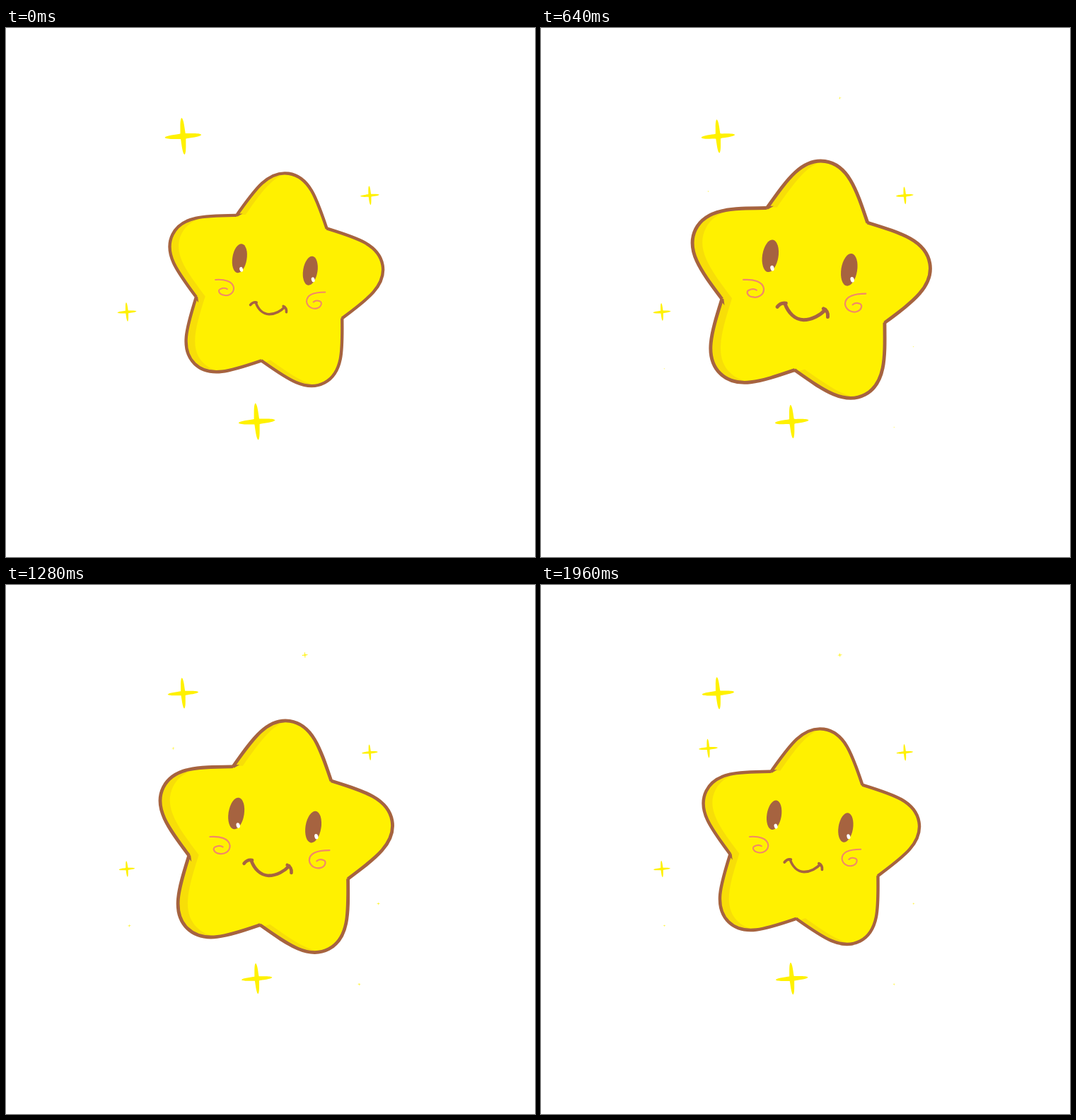
An HTML page that plays this animation: 748 px wide and 748 px high, repeating every 2 s.

```html
<!DOCTYPE html>
<html lang="en">
<head>
<meta charset="utf-8">
<title>Twinkling star</title>
<style>
  html, body { margin: 0; width: 100%; height: 100%; overflow: hidden; background: #fff; }
  svg { display: block; width: 100vw; height: 100vh; }
</style>
</head>
<body>
<svg viewBox="0 0 748 748">
  <defs>
    <path id="body"/>
    <clipPath id="inside"><use href="#body"/></clipPath>
    <path id="spark" transform="rotate(-4.5)"
      d="M0-26C3-24 3-9 3.7-3.7C9-3 24-3 26 0C24 3 9 3 3.7 3.7C3 9 3 24 0 26C-3 24-3 9-3.7 3.7C-9 3-24 3-26 0C-24-3-9-3-3.7-3.7C-3-9-3-24 0-26Z"/>
    <g id="eye">
      <ellipse rx="11.6" ry="23.6" transform="rotate(9)" fill="#a66340"/>
    </g>
  </defs>
  <g id="sparks" fill="#fff100"></g>
  <g id="star">
    <use href="#body" fill="#f7de08"/>
    <g clip-path="url(#inside)"><use href="#body" x="14.5" y="-1" fill="#fff100"/></g>
    <use href="#body" fill="none" stroke="#a66340" stroke-width="5"/>
    <use href="#eye" x="323" y="321.5"/>
    <use href="#eye" x="437" y="341.5"/>
    <g fill="#fff">
      <ellipse rx="2.7" ry="4" transform="translate(325.7 339.3) rotate(-15)"/>
      <ellipse rx="2.7" ry="4" transform="translate(441.5 355.8) rotate(-15)"/>
    </g>
    <g fill="none" stroke="#f2876a" stroke-width="2.3" stroke-linecap="round">
      <path d="M284 356C298 355 312 358 313.5 369C314 378 305 382.5 298 381C290 380 287 373 292 371C296 369 300 369 303 371"/>
      <path d="M461 376C447 376 431 379 431 391C432 400 441 404 448 402C455 400 457 392 452 390.5C448 389 444 390 442 392"/>
    </g>
  </g>
  <path id="mouth" fill="none" stroke="#a66340" stroke-width="5.3" stroke-linecap="round"
    d="M331.5 395Q337 388 344.5 389.5M343 390C348 404 358 414 371 414.5C384 414.5 397 407 404 399M401 397.5Q408.5 401 407.5 410"/>
</svg>
<script>
const LOOP = 2000, STEP = 40, PULSE = 1000, TWINKLE = LOOP / 3;
const byId = id => document.getElementById(id);

// Five identical rounded arms around one centre.
function starPath(cx, cy) {
  const at = (x, y, a) =>
    `${(cx + x * Math.cos(a) - y * Math.sin(a)).toFixed(2)} ${(cy + x * Math.sin(a) + y * Math.cos(a)).toFixed(2)}`;
  let d = '';
  for (let i = 0; i < 5; i++) {
    const a = (-81.7 + 72 * i) * Math.PI / 180;
    const p = (x, y) => at(x, y, a);
    d += `${i ? 'L' : 'M'}${p(101.1, -73.5)}C${p(145.7, -50.8)} ${p(180, -34)} ${p(180, 0)}` +
         `C${p(180, 34)} ${p(145.7, 50.8)} ${p(101.1, 73.5)}`;
  }
  return d + 'Z';
}
byId('body').setAttribute('d', starPath(376.2, 362.8));

// x, y, full size, phase (0 starts large, 1 starts hidden), stays large at the end
const sparks = [
  [250.4, 153, 1, 0], [354.7, 556.5, 1, 0], [514.4, 236.8, .52, 0], [171, 401.5, .52, 0],
  [422.7, 99, 1, 1], [236.5, 231, .52, 1, true], [526.6, 450.6, .52, 1],
  [174.4, 481.8, .52, 1], [499.2, 564.7, .52, 1]
].map(([x, y, size, phase, stays]) => {
  const el = document.createElementNS('http://www.w3.org/2000/svg', 'use');
  el.setAttribute('href', '#spark');
  byId('sparks').append(el);
  return { el, x, y, size, phase, stays };
});

// Triangle wave: 0 at the start of a period, 1 in its middle.
const triangle = (t, period) => 1 - Math.abs(1 - 2 * (t % period) / period);

function scaleAbout(el, x, y, s) {
  el.setAttribute('transform', `translate(${x} ${y}) scale(${s}) translate(${-x} ${-y})`);
}

function draw(t) {
  const pulse = triangle(t, PULSE);
  scaleAbout(byId('star'), 382.5, 355.5, (306 + 48.9 * pulse) / 349);
  scaleAbout(byId('mouth'), 374, 385, (1 + .56 * pulse) / 1.493);

  const wave = triangle(t, TWINKLE);
  for (const { el, x, y, size, phase, stays } of sparks) {
    const held = stays && t > LOOP - TWINKLE / 2;
    const s = size * (held ? 1 : phase ? wave : 1 - wave);
    el.setAttribute('transform', `translate(${x} ${y}) scale(${s})`);
  }
}

const start = performance.now();
function tick() {
  const t = (performance.now() - start) % LOOP;
  draw(Math.floor(t / STEP) * STEP);
  requestAnimationFrame(tick);
}
tick();
</script>
</body>
</html>
```
